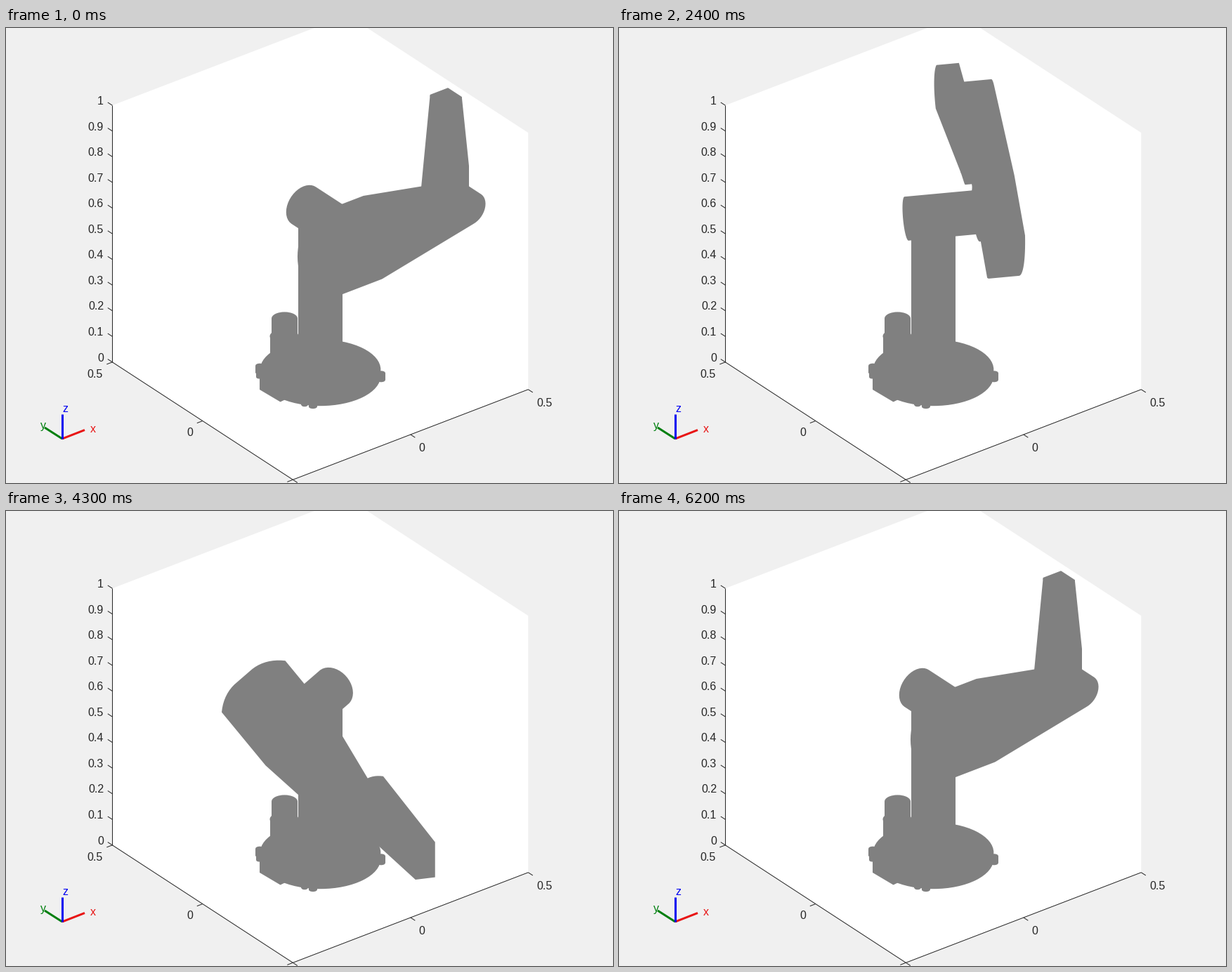
Recreate the animation shown at these times as a matplotlib script. Size 864x648 px, loop 6400 ms.

```python
import numpy as np
import matplotlib.pyplot as plt
from matplotlib.animation import FuncAnimation
from matplotlib.patches import Ellipse, Polygon, Rectangle

W, H, DPI = 864, 648, 100
GREY, INK = "#808080", "#262626"

# Orthographic view: azimuth -37.5, elevation 30 degrees
SCALE = 422.2
AZ, EL = np.radians(37.5), np.radians(30)
CENTRE = np.array([447.3, 495.3])
VIEW = SCALE * np.array([
    [np.cos(AZ), -np.sin(AZ), 0],
    [-np.sin(AZ) * np.sin(EL), -np.cos(AZ) * np.sin(EL), -np.cos(EL)],
])
LIMITS = [(-0.5, 0.5), (-0.5, 0.5), (0.0, 1.0)]

# Joint angles in degrees: waist, shoulder, elbow
POSES = np.array([(0, 0, 90), (90, 45, 180), (-90, -45, 0), (360, 0, 90)])
STEPS = 20
SHOULDER_Z = 0.6217
ARM_LEN = 0.4318


def project(points):
    return CENTRE + np.asarray(points) @ VIEW.T


def hull(points):
    """Indices of the convex hull of 2D points, in order."""
    points = np.round(points, 9)  # keeps collinear points in sorted order
    order = np.lexsort((points[:, 1], points[:, 0])).tolist()
    xy = points.tolist()

    def chain(indices):
        out = []
        for i in indices:
            x, y = xy[i]
            while len(out) > 1:
                (ax, ay), (bx, by) = xy[out[-2]], xy[out[-1]]
                if (bx - ax) * (y - ay) - (by - ay) * (x - ax) > 0:
                    break
                out.pop()
            out.append(i)
        return out[:-1]

    return chain(order) + chain(order[::-1])


def clip(points, axis, sign, limit):
    """Cut a convex solid, given by its corners, with one plane."""
    gap = limit - sign * points[:, axis]
    inside, outside = points[gap >= 0], points[gap < 0]
    if len(inside) == 0 or len(outside) == 0:
        return inside
    g_in, g_out = gap[gap >= 0], gap[gap < 0]
    t = (g_in[:, None] / (g_in[:, None] - g_out[None, :]))[..., None]
    cut = inside[:, None] + t * (outside[None] - inside[:, None])
    cut = cut.reshape(-1, 3)
    keep = hull(np.delete(cut, axis, axis=1))
    return np.vstack([inside, cut[keep]])


def silhouette(points):
    for axis, (low, high) in enumerate(LIMITS):
        for sign, limit in ((1, high), (-1, -low)):
            points = clip(points, axis, sign, limit)
            if len(points) == 0:
                return np.zeros((3, 2))
    flat = project(points)
    return flat[hull(flat)]


def arc(radius, start=0, stop=360, centre=0.0, count=41):
    t = np.radians(np.linspace(start, stop, count))
    return np.column_stack([centre + radius * np.cos(t), radius * np.sin(t)])


def back_arc(radius, half):
    """Rounded rear end, cut off at the given half height."""
    a = np.degrees(np.arcsin(half / radius))
    return arc(radius, 180 - a, 180 + a, count=19)


def edge(reach, half):
    return [(reach, half), (reach, -half)]


def prism(near, far, *profile):
    outline = np.vstack(profile)
    return np.vstack([np.column_stack([outline, np.full(len(outline), n)])
                      for n in (near, far)])


SHOULDER = [prism(-0.0917, 0.17, arc(0.0745)), prism(0.15, 0.17, arc(0.1))]
UPPER = [prism(0.17, 0.273, back_arc(0.227, 0.1385), edge(0.053, 0.1385),
               arc(0.061, centre=ARM_LEN))]
FOREARM = [prism(0.095, 0.172, back_arc(0.128, 0.089), edge(0.376, 0.038)),
           prism(0.095, 0.172, edge(0.37, 0.038),
                 arc(0.038, -90, 90, ARM_LEN))]


def place(solid, waist, tilt, origin=(0.0, 0.0)):
    a, b, n = solid.T
    reach = origin[0] + a * np.cos(tilt) - b * np.sin(tilt)
    z = SHOULDER_Z + origin[1] + a * np.sin(tilt) + b * np.cos(tilt)
    return np.column_stack([
        reach * np.cos(waist) + n * np.sin(waist),
        reach * np.sin(waist) - n * np.cos(waist),
        z,
    ])


def arm(waist, shoulder, elbow):
    joint = (ARM_LEN * np.cos(shoulder), ARM_LEN * np.sin(shoulder))
    solids = [place(s, waist, 0) for s in SHOULDER]
    solids += [place(s, waist, shoulder) for s in UPPER]
    solids += [place(s, waist, shoulder + elbow, joint) for s in FOREARM]
    return [silhouette(s) for s in solids]


def pose(frame):
    """Linear joint motion; each leg ends with one held step."""
    leg = min(frame // (STEPS + 1), len(POSES) - 2)
    t = min(frame - leg * (STEPS + 1), STEPS) / STEPS
    return np.radians(POSES[leg] + t * (POSES[leg + 1] - POSES[leg]))


fig = plt.figure(figsize=(W / DPI, H / DPI), dpi=DPI, facecolor="#f0f0f0")
ax = fig.add_axes([0, 0, 1, 1])
ax.set_xlim(0, W)
ax.set_ylim(H, 0)
ax.axis("off")


def fill(points, color=GREY):
    return ax.add_patch(Polygon(points, closed=True, fc=color, lw=0))


def line(start, end, color=INK, width=1.0):
    ax.plot(*zip(start, end), color=color, lw=width * 72 / DPI,
            solid_capstyle="butt")


def label(x, base, text, color=INK, ha="center"):
    ax.text(x, base, text, color=color, ha=ha, va="baseline",
            family="Liberation Sans", fontsize=16 * 72 / DPI)


def drum(x, top, bottom, radius):
    """Upright cylinder between two screen heights."""
    for y in (top, bottom):
        ax.add_patch(Ellipse((x, y), 2 * radius, radius, fc=GREY, lw=0))
    ax.add_patch(Rectangle((x - radius, top), 2 * radius, bottom - top,
                           fc=GREY, lw=0))


def draw_axes():
    left, front, right, far, top = project([
        (-.5, .5, 0), (-.5, -.5, 0), (.5, -.5, 0), (.5, .5, 1), (-.5, .5, 1)])
    rise = top - left
    fill([left, front, right, right + rise, far, top], "white")
    for start, end in ((top, left), (left, front), (front, right)):
        line(start, end)
    along_y, along_x = np.array([6.5, 4.2]), np.array([-8, 3.1])
    for t in np.linspace(0, 1, 11):
        p = left + rise * t
        line(p, p - along_y)
        label(139, p[1] - 1.2, f"{t:.1g}", ha="right")
    for t in (0, 0.5, 1):
        p = front + (left - front) * t
        line(p, p + along_x)
        label(p[0] - 14, p[1] + 21.7, f"{t - 0.5:g}", ha="right")
        p = front + (right - front) * t
        line(p, p + along_y)
        label(p[0] + 12, p[1] + 24, f"{t - 0.5:g}", ha="left")


def draw_triad():
    for end, color, text, x, base in (
            ((112, 572.5), "#e81414", "x", 124, 575.5),
            ((55, 569), "#007f0e", "y", 52.5, 571),
            ((80, 550), "#0000f0", "z", 84, 547)):
        line((80, 585), end, color, 3)
        label(x, base, text, color)


def draw_base():
    x, y, rim = 447.5, 491, 87

    def bolt(angle, radius, half):
        a = np.radians(angle)
        bx, by = x + rim * np.cos(a), y + rim / 2 * np.sin(a)
        drum(bx, by - half, by + half, radius)

    for top, bottom, radius in ((486.5, 495.3, 85.8), (268, 486, 31.5)):
        for cy in (top, bottom):
            ax.add_patch(Ellipse((x, cy), 2 * radius, radius, fc=GREY, lw=0))
        ax.add_patch(Rectangle((x - radius, top), 2 * radius, bottom - top,
                               fc=GREY, lw=0))
    drum(396.5, 413.7, 470, 18.5)
    drum(396, 439, 470, 20.5)
    for angle in (7, 97, 187, 277):
        bolt(angle, 6, 5)
    for angle in (105, 177):
        bolt(angle, 4.5, 4)
    fill([(361, 480), (361, 515), (390.5, 532.5), (x, 505)])


draw_axes()
draw_triad()
draw_base()
parts = [fill(shape) for shape in arm(*pose(0))]


def update(frame):
    for part, shape in zip(parts, arm(*pose(frame))):
        part.set_xy(shape)
    return parts


anim = FuncAnimation(fig, update, frames=64, interval=100,
                     repeat=True, repeat_delay=0)
plt.show()
```
